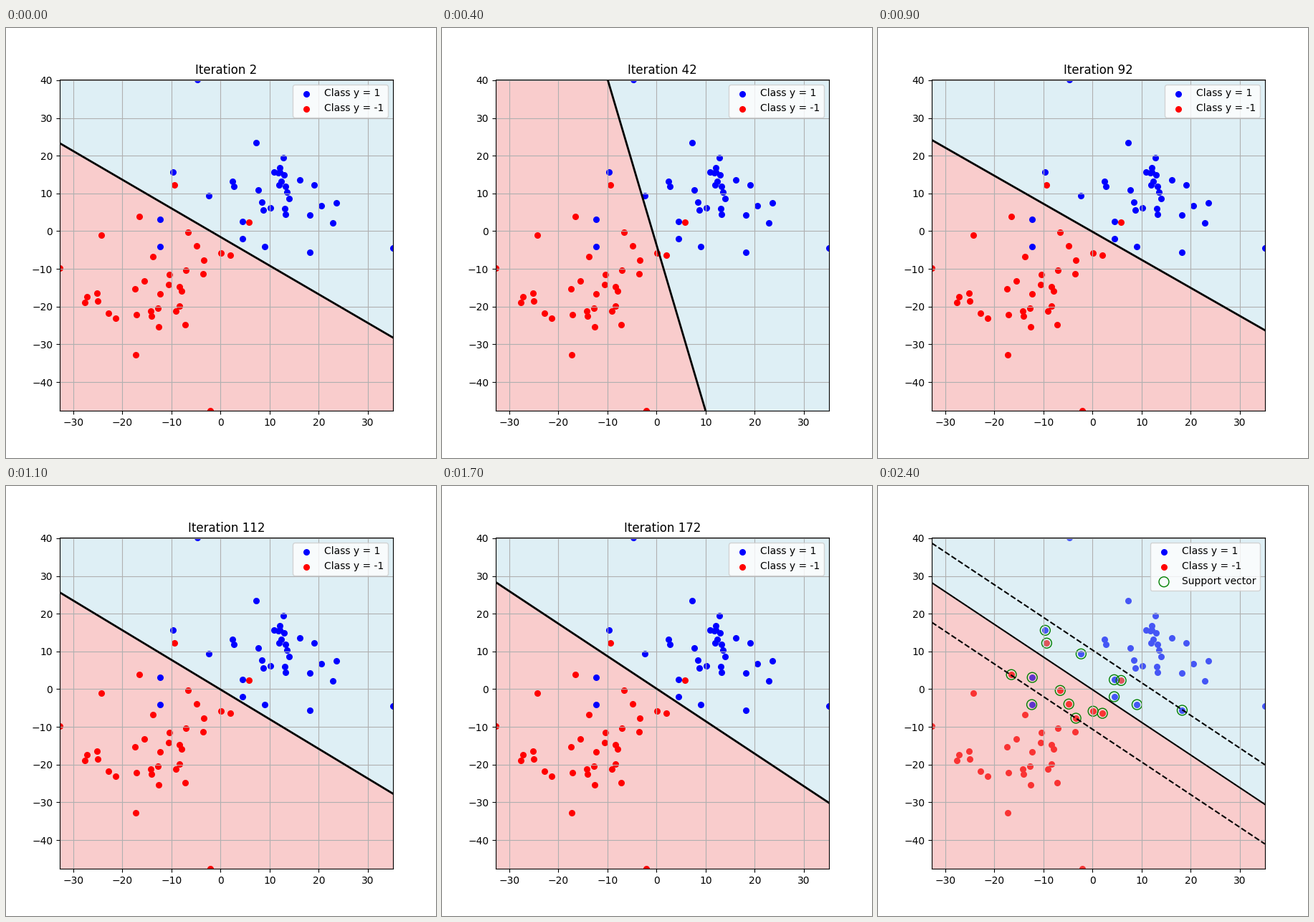
Animation, 600 px wide and 600 px high, one loop 2.5 s. Source, as a matplotlib script:

```python
import numpy as np
import matplotlib.pyplot as plt
from matplotlib.animation import FuncAnimation

FRAMES, INTERVAL = 25, 100
XLIM, YLIM = (-32.775, 35.13), (-47.6, 40.18)
SLOPE, BIAS, MARGIN = 0.8657, -0.15, 10.5

rng = np.random.default_rng(7)
xs = np.array(XLIM)
fig, ax = plt.subplots(figsize=(6, 6), dpi=100)


def cloud(sign, center, spread, n=26):
    """Normal cluster that stays clear of the margin."""
    z = rng.normal(size=(400, 2))
    pts = center + z * spread
    score = sign * (pts[:, 1] + SLOPE * pts[:, 0] - BIAS)
    keep = (score > MARGIN + 1) & (np.abs(z) < 2.2).all(axis=1)
    return pts[keep][:n]


# Points that shape the margin, and the outliers that set the limits
POS_SV = [(-9.65, 15.6), (-2.35, 9.35), (4.4, 2.5), (-12.3, 3.1),
          (-12.4, -4.1), (4.4, -2), (9.05, -4.1), (18.25, -5.6)]
NEG_SV = [(-9.35, 12.2), (5.8, 2.3), (-16.55, 3.85), (-6.6, -0.35),
          (-4.85, -3.95), (0.1, -5.85), (2, -6.4), (-3.4, -7.7)]
POS_FAR = [(-4.75, YLIM[1]), (XLIM[1], -4.5)]
NEG_FAR = [(XLIM[0], -9.8), (-2.1, YLIM[0])]

POS = np.vstack([POS_SV, POS_FAR, cloud(1, (12.3, 11.5), (7.8, 6))])
NEG = np.vstack([NEG_SV, NEG_FAR, cloud(-1, (-13.5, -15), (8, 8.5))])

# Early swings of the boundary: frame, tilt in degrees, distance from origin
SWINGS = [(0, 37.2, -1.24), (2, 47.6, 4.92), (4, 77.2, -0.82),
          (6, 42, -0.3), (7, 34.7, -0.2)]
SETTLE = SWINGS[-1][0]


def boundary(i):
    if i <= SETTLE:
        t, tilts, dists = zip(*SWINGS)
        tilt, dist = np.interp(i, t, tilts), np.interp(i, t, dists)
    else:
        u = min((i - SETTLE) / 12, 1)
        tilt, dist = 40.92 - 6.2 * (1 - u) ** 2, -0.2 + 0.35 * u
    a = np.radians(tilt)
    return dist / np.cos(a) - np.tan(a) * xs


def regions(y):
    ax.fill_between(xs, y, 200, color="lightblue", alpha=0.4, lw=0)
    ax.fill_between(xs, y, -300, color="lightcoral", alpha=0.4, lw=0)


def points():
    ax.scatter(*POS.T, s=30, color="blue", label="Class y = 1")
    ax.scatter(*NEG.T, s=30, color="red", label="Class y = -1")


def draw_step(i):
    y = boundary(i)
    regions(y)
    points()
    ax.plot(xs, y, "k-", lw=2)
    ax.set_title(f"Iteration {10 * i + 2}")


def draw_result():
    y = BIAS - SLOPE * xs
    points()
    regions(y)
    ax.scatter(*np.vstack([POS_SV, NEG_SV]).T, s=100, facecolors="none",
               edgecolors="green", label="Support vector")
    for shift, style in ((-MARGIN, "--"), (0, "-"), (MARGIN, "--")):
        ax.plot(xs, y + shift, color="black", ls=style, lw=1.5)


def draw(i):
    ax.clear()
    if i < FRAMES - 1:
        draw_step(i)
    else:
        draw_result()
    ax.set(xlim=XLIM, ylim=YLIM)
    ax.grid(True)
    ax.legend(loc="upper right")
    return []


anim = FuncAnimation(fig, draw, frames=FRAMES, interval=INTERVAL,
                     init_func=lambda: [], repeat=True, repeat_delay=0)
plt.show()
```
